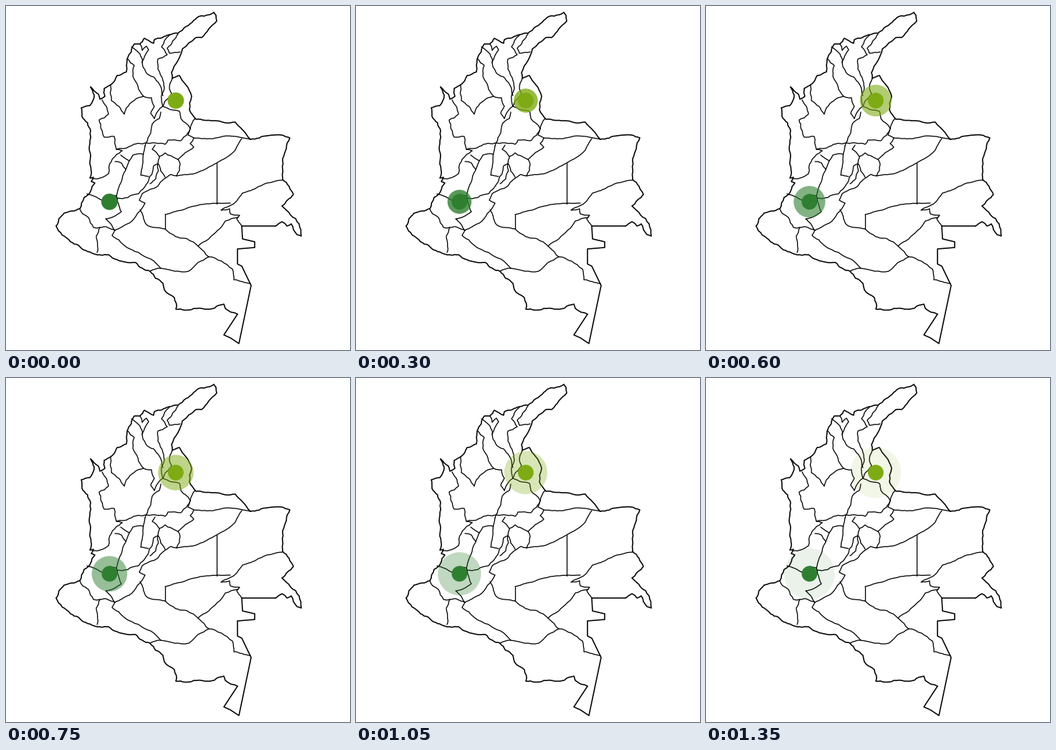
A matplotlib script for the animation above (1.5 s loop, 480 by 480 pixels).

```python
import math
import random

import matplotlib.pyplot as plt
from matplotlib.animation import FuncAnimation
from matplotlib.patches import Circle

SIZE, DPI = 480, 100
FRAMES, INTERVAL = 10, 150
PX = 72 / DPI

# Pulse centres and colours
SITES = [((236.9, 132.0), "#7eab13"), ((144.4, 273.2), "#2f7f31")]

rng = random.Random(4)
fig = plt.figure(figsize=(SIZE / DPI, SIZE / DPI), dpi=DPI, facecolor="white")
ax = fig.add_axes([0, 0, 1, 1])
ax.axis("off")


def wiggle(a, b, rough):
    """Points after a up to b, displaced sideways at each midpoint."""
    dx, dy = b[0] - a[0], b[1] - a[1]
    if not rough or math.hypot(dx, dy) < 5:
        return [b]
    k = rng.uniform(-rough, rough)
    mid = ((a[0] + b[0]) / 2 - k * dy, (a[1] + b[1]) / 2 + k * dx)
    return wiggle(a, mid, rough) + wiggle(mid, b, rough)


def line(*pts, width=1.3, rough=0.1):
    path = [pts[0]]
    for a, b in zip(pts, pts[1:]):
        path += wiggle(a, b, rough)
    ax.plot(*zip(*path), color="black", lw=width * PX, zorder=1,
            solid_joinstyle="round", solid_capstyle="round")


def border(*pts, rough=0.1):
    line(*pts, width=1.6, rough=rough)


# Outer border
border((290, 9), (271, 14), (262, 20), (240, 38), (228, 40), (207, 47), (206, 52),
       (193, 45), (187, 53), (179, 53), (169, 74), (168, 92), (155, 97), (146, 110),
       (137, 115), (138, 126), (131, 130), (129, 123), (118, 113))
border((118, 113), (123, 124), (117, 139), (105, 142), (106, 154), (118, 174),
       (117, 192), (117, 218), (117, 240), (122, 239), (119, 245), (124, 247),
       (109, 267), (103, 283), (81, 289), (70, 307))
border((70, 307), (90, 329), (111, 341), (123, 346), (143, 347), (155, 354),
       (181, 358), (201, 370), (219, 387), (221, 396), (235, 407), (237, 423),
       (262, 422), (277, 423), (304, 416), (306, 422), (323, 430))
border((323, 430), (304, 459), (313, 463), (325, 471), (342, 390), (329, 363),
       (323, 360), (323, 339), (347, 337), (347, 329), (330, 325), (329, 307),
       (376, 307), rough=0)
border((376, 307), (385, 301), (392, 307), (398, 304), (406, 319), (412, 321),
       (409, 304), (385, 279), (401, 263), (386, 242), (386, 213), (396, 184),
       (384, 180), (365, 181), (341, 186))
border((341, 186), (320, 162), (290, 160), (265, 158), (256, 145), (259, 126),
       (251, 110), (242, 97), (232, 101), (231, 93), (240, 76), (246, 60),
       (265, 44), (273, 44), (294, 21), (293, 13), (290, 9), rough=0.07)

# Northern divisions
line((187, 53), (190, 62), (196, 56), (199, 61), (190, 78), (195, 92), (214, 109),
     (219, 125))
line((228, 41), (217, 57), (225, 68), (212, 74), (212, 88), (219, 104), (217, 130),
     (219, 140), (207, 157))
line((240, 39), (225, 59), (228, 66), (243, 64))
line((175, 57), (187, 67), (190, 79))
line((170, 74), (179, 83), (177, 98), (192, 126), (168, 142), (165, 151),
     (147, 132), (146, 110))
line((192, 126), (203, 128), (207, 140), (202, 150), (207, 157))
line((134, 131), (143, 151), (130, 159), (137, 183), (151, 182), (154, 200),
     (162, 202))
line((216, 148), (214, 157), (204, 165), (194, 195))
line((232, 101), (228, 115), (231, 122), (219, 140), (242, 147), (244, 157),
     (257, 171))

# Central divisions
line((154, 200), (172, 196), (222, 193), (226, 187), (244, 188), (257, 171),
     (264, 157))
line((257, 171), (254, 180), (262, 184), (302, 182), (341, 186), rough=0.06)
line((329, 185), (320, 201), (294, 219), (268, 232), (238, 237), rough=0.05)
line((262, 184), (257, 192), (262, 197), (240, 214), (243, 221), (238, 237))
line((208, 194), (204, 200), (214, 210), (222, 205), (240, 214))
line((214, 210), (212, 220), (222, 239))
line((212, 220), (206, 223), (198, 246), (185, 262), (154, 268))
line((212, 220), (209, 241), (201, 248))
line((194, 195), (188, 236), (199, 238), rough=0.05)
line((162, 202), (147, 217), (143, 234), (122, 241))
line((160, 208), (172, 216), (177, 208), (192, 207))
line((152, 217), (161, 219), (167, 228))
line((172, 216), (164, 234), (154, 266), rough=0.05)

# Southern divisions
line((113, 262), (134, 271), (145, 263), (154, 265), (161, 287), (150, 294),
     (139, 297), (152, 313))
line((103, 283), (107, 290), (115, 295), (122, 309), (131, 309), (152, 313))
line((131, 309), (126, 321), (127, 344))
line((238, 237), (230, 235), (190, 262), (186, 271), (194, 275), (172, 303),
     (152, 313), (148, 320), (185, 344), (216, 366), (255, 370), (283, 350),
     rough=0.07)
line((187, 284), (195, 304), (222, 311))
line((216, 366), (201, 370))
line((313, 275), (280, 276), (245, 285), (222, 291), rough=0.04)
line((222, 311), (237, 322), (247, 324), (268, 335), (283, 350), (316, 367),
     (318, 382), (341, 387))
line((386, 243), (352, 252), (330, 261), (322, 272), (300, 285), (312, 283),
     (313, 290), (326, 292), (322, 297), (329, 307), rough=0.07)
line((324, 295), (306, 300), (283, 325), (268, 335), rough=0.07)
line((294, 219), (294, 276), rough=0)
line((222, 291), (222, 311), rough=0)

ax.set_xlim(0, SIZE)
ax.set_ylim(SIZE, 0)

rings = []
for centre, colour in SITES:
    ring = Circle(centre, 11, fc=colour, ec="none", zorder=2)
    rings.append(ax.add_patch(ring))
    ax.add_patch(Circle(centre, 10.9, fc=colour, ec="none", zorder=3))


def update(i):
    t = i / FRAMES
    for ring in rings:
        ring.set_radius(11.4 + 26.7 * t)
        ring.set_alpha(1 - t)
    return rings


anim = FuncAnimation(fig, update, frames=FRAMES, interval=INTERVAL,
                     repeat=True, repeat_delay=0)
plt.show()
```
